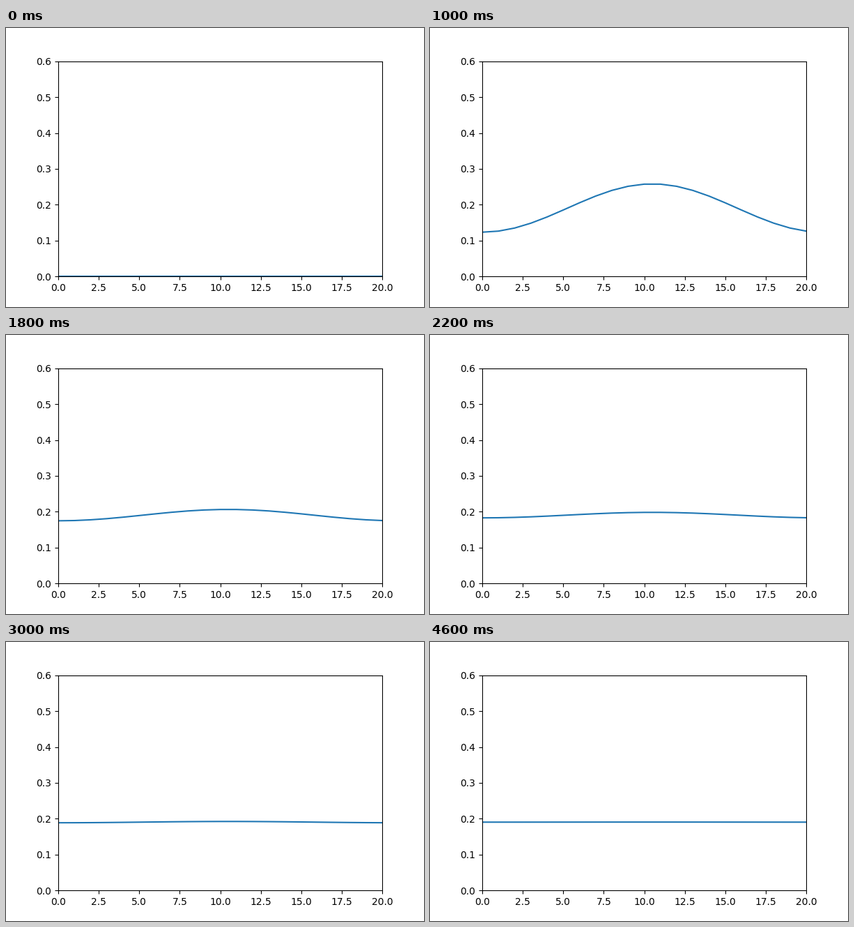
These frames come from a looping animation (600x400 px, 5200 ms). A matplotlib script:

```python
import numpy as np
import matplotlib.pyplot as plt
from matplotlib.animation import FuncAnimation

N = 21            # cells on a periodic ring
RATE = 0.4        # diffusion number per step
STEPS = 10        # steps between drawn frames
FRAMES = 26


def diffuse(u, steps):
    for _ in range(steps):
        u = u + RATE * (np.roll(u, 1) - 2 * u + np.roll(u, -1))
    return u


x = np.arange(N)
start = np.where((x >= 7) & (x <= 14), 0.5, 0.0)

fig, ax = plt.subplots(figsize=(6, 4), dpi=100)
ax.set_xlim(0, 20)
ax.set_ylim(0, 0.6)
line, = ax.plot(x, np.zeros(N))


def update(i):
    # blank first, then the state after 1, 11, 21, ... steps
    u = diffuse(start, 1 + STEPS * (i - 1)) if i else np.zeros(N)
    line.set_ydata(u)
    return line,


anim = FuncAnimation(fig, update, frames=FRAMES, interval=200,
                     repeat=True, repeat_delay=0)
plt.show()
```
